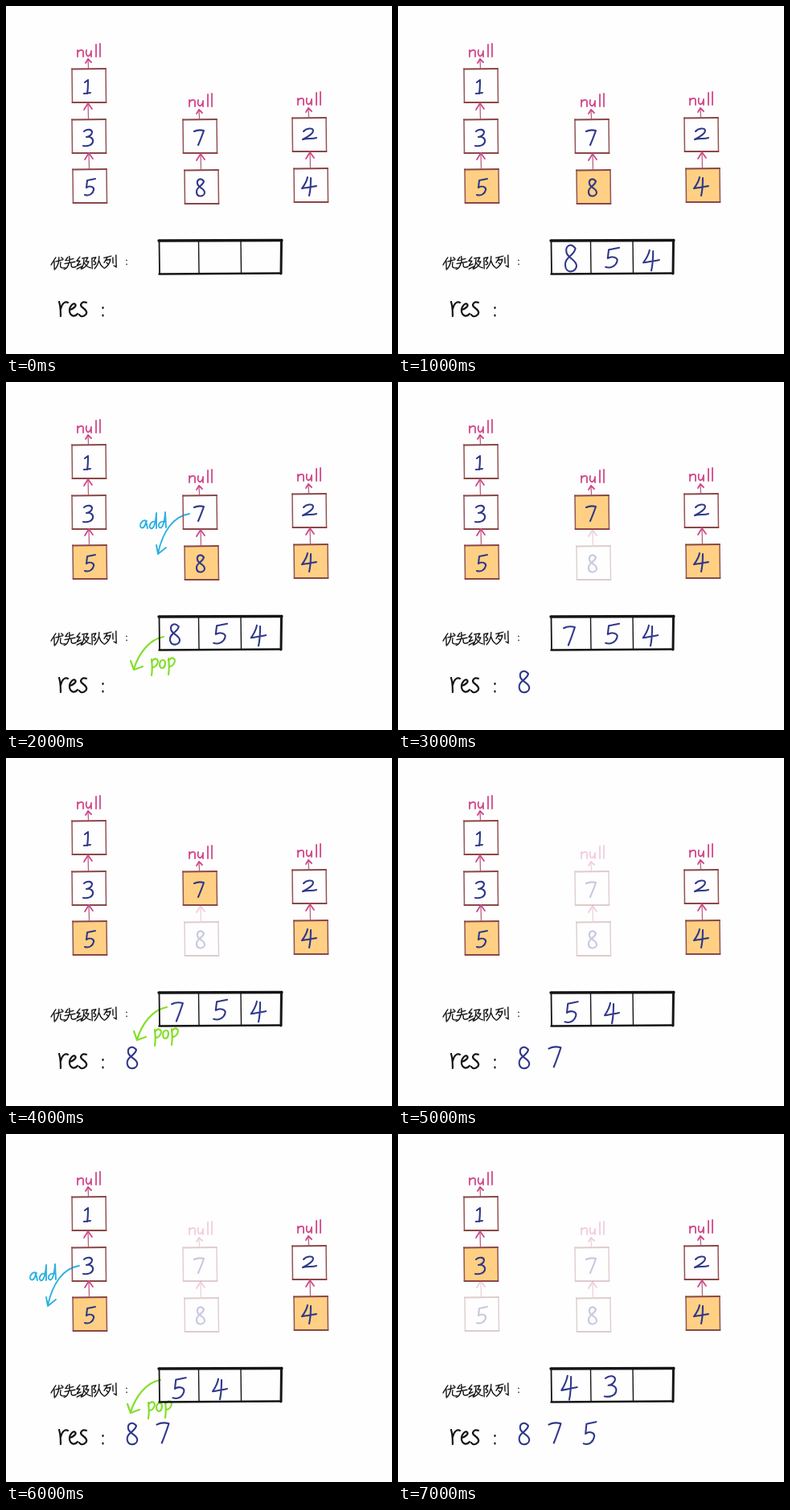
An HTML page that plays this animation: 480 by 433 pixels, repeating every 8000 ms.

```html
<!DOCTYPE html>
<html lang="zh">
<head>
<meta charset="utf-8">
<title>Merging sorted lists</title>
<style>
html, body { margin: 0; width: 100%; height: 100%; overflow: hidden; background: #fefefe; }
svg { display: block; width: 100vw; height: 100vh; }
path { fill: none; stroke-linecap: round; stroke-linejoin: round; vector-effect: non-scaling-stroke; }
.digit { stroke: #30388a; stroke-width: 2.1; }
.pink { stroke: #d1478a; stroke-width: 1.8; }
.shaft { stroke: #b86482; stroke-width: 1.3; }
.box { stroke: #935354; stroke-width: 1.5; }
.edge { stroke: #8b4748; stroke-width: 2; }
.ink { stroke: #151515; stroke-width: 2.2; }
.frame { stroke: #151515; }
.label { stroke: #151515; stroke-width: 1.4; }
.add { stroke: #2eb1df; stroke-width: 1.9; }
.pop { stroke: #84df2b; stroke-width: 2.2; }
.fill { fill: #ffd083; }
.scene { visibility: hidden; animation: slot 8s step-end infinite; }
.fade8 { animation: fade8 8s step-end infinite; }
.fade7 { animation: fade7 8s step-end infinite; }
.fade5 { animation: fade5 8s step-end infinite; }
@keyframes slot { 0% { visibility: visible; } 12.5%, 100% { visibility: hidden; } }
@keyframes fade8 { 0% { opacity: 1; } 37.5%, 100% { opacity: .27; } }
@keyframes fade7 { 0% { opacity: 1; } 62.5%, 100% { opacity: .27; } }
@keyframes fade5 { 0% { opacity: 1; } 87.5%, 100% { opacity: .27; } }
</style>
</head>
<body>
<svg viewBox="0 0 480 433" preserveAspectRatio="none" role="img" aria-label="Three linked lists, 优先级队列 and res">
  <g id="scenes"></g>
  <g id="nodes"></g>
  <g class="frame" aria-label="priority queue cells">
    <path d="M190 292L343 291.5" stroke-width="3.4"/>
    <path d="M342.5 292L342 333" stroke-width="3"/>
    <path d="M190.5 292L191 333" stroke-width="1.8"/>
    <path d="M190.5 333.5L342 332.5" stroke-width="2.4"/>
    <path d="M239.5 293L240 332M292 293L292.5 332" stroke-width="1.4"/>
  </g>
  <g class="label" aria-label="优先级队列" transform="rotate(-1.5 97 319)">
    <path d="M62 312L56 321M60 317V327M62 317L71 315M66 312C66 320 64 324 60 327M68 318C67 324 67 326 73 325M69 312L71 314"/>
    <path d="M77 312L74 316M75 316L84 314M79 311V319M73 320L86 318M78 320C77 324 75 326 72 327M81 320C81 325 82 326 87 324"/>
    <path d="M92 312L88 317H92L88 323L93 321M88 327L94 324M95 314L102 313L99 318H103C101 323 97 326 94 327M97 314C97 320 96 324 93 327M97 319C99 323 101 325 105 326"/>
    <path d="M107 314V327M107 314L112 313L109 318C113 319 112 322 109 322M116 312C116 319 114 323 110 327M116 318C117 322 118 324 121 326"/>
    <path d="M122 314L131 312M126 314L122 320M125 317L130 316C129 321 126 325 122 327M125 320L127 322M133 314V321M137 311V326L134 324"/>
    <path d="M150 317.5V318M150 322.5V323"/>
  </g>
  <g class="ink" aria-label="res">
    <path d="M66 368C68 374 68 380 68 386M68 377C69 371 73 367 77 369"/>
    <path d="M79 378C84 377 88 373 86 371S79 373 79 379S85 388 89 383"/>
    <path d="M100 369C94 367 91 372 95 375S102 381 99 384S93 387 91 384"/>
    <path d="M120.5 375V376M120.5 384.500V385.500"/>
  </g>
  <circle cx="433" cy="237" r=".6" fill="#e4e4e4"/>
</svg>
<script>
const digits = {
  1: 'M-4 -5L0 -8C0 -3 0 3 -1 9M-5 9L3 8',
  2: 'M-7 -4C-4 -8 5 -9 5 -5S-2 3 -8 6C-2 4 4 6 9 4',
  3: 'M-5 -8C0 -12 5 -10 5 -7S1 -1 -2 -1C3 -2 7 1 6 5S0 11 -6 10',
  4: 'M-2 -11C-3 -6 -6 -1 -9 3C-3 2 4 1 9 0M2 -10C2 0 1 8 0 12',
  5: 'M-3 -9L-4 0C0 -3 6 -1 5 3S0 11 -6 9M-3 -9L7 -11',
  7: 'M-6 -7C-2 -9 2 -9 6 -8C4 -2 2 3 -1 10',
  8: 'M4 -8C0 -13 -5 -10 -4 -5S5 1 5 6S-4 13 -5 6S3 -2 4 -8'
};
const nullWord = 'M1 7V15M1 10C3 6 8 6 8 9V15M12 7C10 16 17 17 18 8V15M24 0V15M29 -1V15';
const addMark = 'M228 164C208 167 195 186 189 213M187 203L189 214L199 206' +
  'M175 173C169 170 165 179 168 181S174 178 174 173L176 182' +
  'M186 174C180 172 177 180 180 182S186 177 187 163V182' +
  'M197 174C191 172 188 179 191 181S197 177 198 162L199 181';
const popMark = 'M196 317C178 320 165 338 159 357M155 347L159 358L170 354' +
  'M181 345C182 353 182 359 181 365M181 348C186 341 191 346 188 351S183 355 182 354' +
  'M195 346C190 346 190 356 194 356S200 346 195 346' +
  'M202 344C203 352 203 358 202 364M202 347C207 340 212 345 209 350S204 354 203 353';

const path = (cls, d, x = 0, y = 0, sx = 1, sy = sx) =>
  `<path class="${cls}" d="${d}" transform="translate(${x} ${y}) scale(${sx} ${sy})"/>`;
const digit = (n, x, y, sx, sy) => path('digit', digits[n], x, y, sx, sy);

// value: [box left, box top, digit x, digit y]
const nodes = {
  1: [82, 78, 102, 100], 3: [82, 141, 102, 164], 5: [83, 203, 104, 226],
  7: [220, 141, 240, 163], 8: [222, 204, 242, 226],
  2: [356, 139, 377, 160], 4: [358, 202, 377, 224]
};
const heads = { 1: [88, 48], 7: [227, 110], 2: [362, 108] };

function node(n) {
  const [x, y, dx, dy] = nodes[n];
  const top = heads[n];
  const ax = x + 20, tip = y - (top ? 12 : 20);
  return `<g class="fade${n}">` +
    path('shaft', `M${ax} ${tip}L${ax + .5} ${y - 1}`) +
    path('pink', top ? 'M-3 5L0 0L4 4' : 'M-5 8L0 0L5 7', ax, tip) +
    (top ? path('pink', nullWord, ...top) : '') +
    path('box', `M${x} ${y}L${x + .5} ${y + 42}M${x + 42} ${y}L${x + 42.5} ${y + 42}`) +
    path('edge', `M${x} ${y + .5}L${x + 42} ${y}M${x + .5} ${y + 42}H${x + 42.5}`) +
    digit(n, dx, dy) + '</g>';
}

const queue = {
  first: digit(8, 215, 314, 1.4, 1.55) + digit(5, 266, 314, 1.3, 1.2) + digit(4, 315, 316, 1.1),
  popping: digit(8, 210, 314, 1.2) + digit(5, 266, 314, 1.3, 1.2) + digit(4, 314, 315, 1.03, 1.1),
  seven: digit(7, 213, 315, 1.15, 1.25) + digit(5, 266, 314, 1.3, 1.2) + digit(4, 314, 315, 1.03, 1.1),
  two: digit(5, 215, 317, 1.25) + digit(4, 266, 317, 1, 1.1),
  last: digit(4, 213, 315, 1.08, 1.3) + digit(3, 264, 314, 1.2, 1.25)
};
const res = [digit(8, 157, 373, 1.25), digit(7, 195, 371, 1.25, 1.35), digit(5, 238, 373, 1.2, 1.35)];
const pop = (x, y) => path('pop', popMark, x, y);
const add = (x, y) => path('add', addMark, x, y);

// one second each: [filled nodes, queue, result length, marks]
const scenes = [
  [[], '', 0, ''],
  [[5, 8, 4], queue.first, 0, ''],
  [[5, 8, 4], queue.popping, 0, add(0, 0) + pop(0, 0)],
  [[5, 7, 4], queue.seven, 1, ''],
  [[5, 7, 4], queue.seven, 1, pop(4, -7)],
  [[5, 4], queue.two, 2, ''],
  [[5, 4], queue.two, 2, add(-137, 0) + pop(-4, -11)],
  [[3, 4], queue.last, 3, '']
];
const fill = n => `<rect class="fill" x="${nodes[n][0]}" y="${nodes[n][1]}" width="42" height="42"/>`;

document.getElementById('nodes').innerHTML = Object.keys(nodes).map(node).join('');
document.getElementById('scenes').innerHTML = scenes.map(([on, cells, count, marks], i) =>
  `<g class="scene" style="animation-delay:${i ? i - 8 : 0}s">` +
  on.map(fill).join('') + cells + res.slice(0, count).join('') + marks + '</g>').join('');
</script>
</body>
</html>
```
